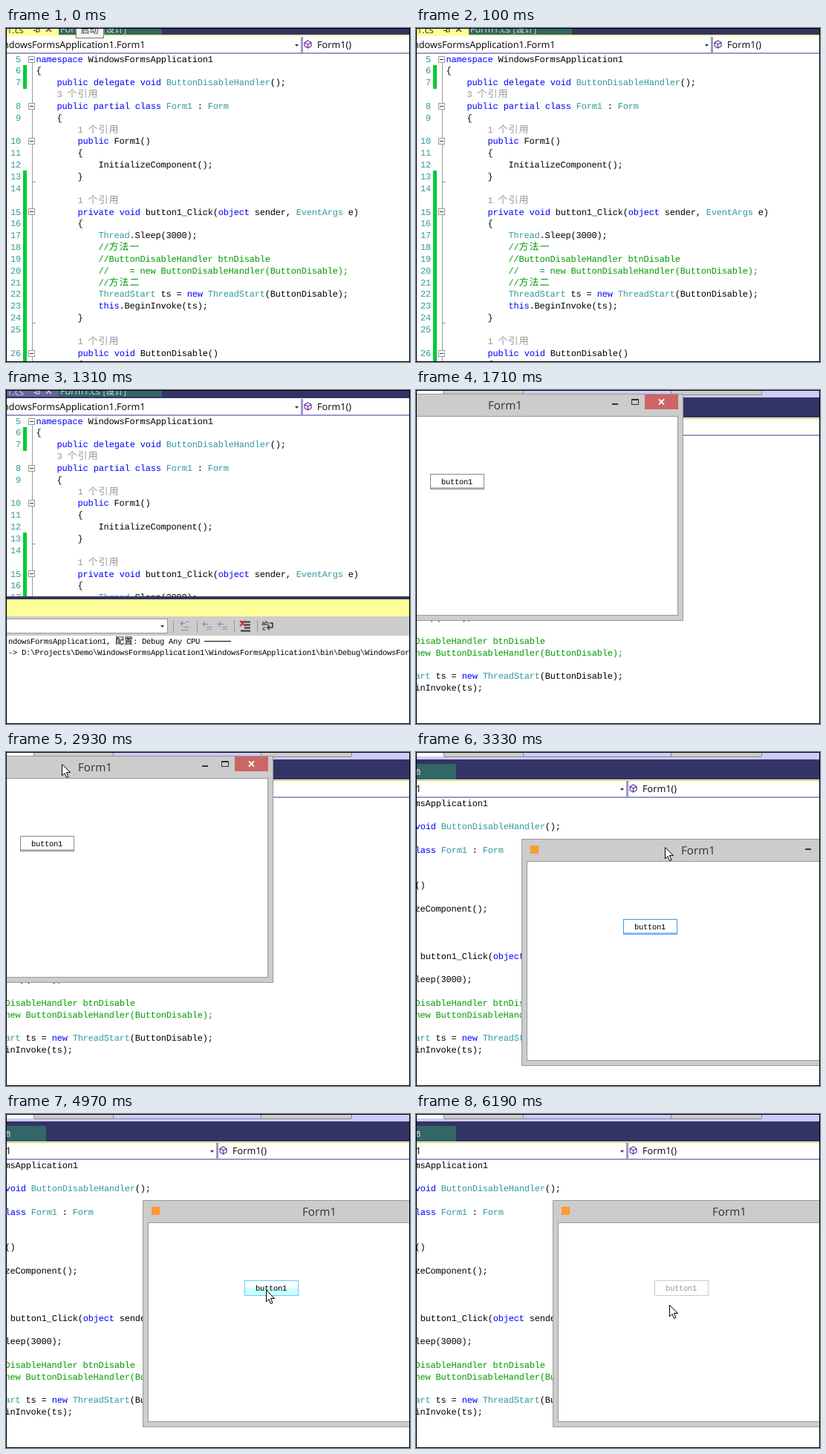
An HTML page that plays this animation: 544x450 px, repeating every 8000 ms.

```html
<!DOCTYPE html>
<html lang="zh">
<head>
<meta charset="utf-8">
<title>Form1</title>
<style>
html, body { margin: 0; width: 100%; height: 100%; overflow: hidden; background: #fff; }
svg { display: block; width: 544px; height: 450px; }
text { white-space: pre; text-rendering: geometricPrecision; }
.code { font: 12px "Liberation Mono", monospace; letter-spacing: -.2px; }
.small { font: 10.5px "Liberation Mono", monospace; letter-spacing: -.3px; }
.ui { font: 12.7px "Open Sans", sans-serif; }
.cap { font: 15.2px "Open Sans", sans-serif; fill: #333; }
.tip { font: 12px "Noto Sans CJK SC", "Noto Sans CJK", sans-serif; }
.han { font-family: "Noto Sans CJK SC", "Noto Sans CJK", sans-serif; font-size: 13px; font-weight: 300; letter-spacing: 1px; }
.small .han { font-size: 12px; letter-spacing: 0; }
.kw { fill: #00f; } .type { fill: #399; } .note { fill: #090; } .ref { fill: #999; }
</style>
</head>
<body>
<svg id="stage" viewBox="0 0 544 450"></svg>
<script>
const NAVY = '#333366', GREEN = '#336666', LILAC = '#ccccff', EDGE = '#9999cc', GRAY = '#cccccc', YELLOW = '#ffff99';
const LOOP = 8000;

const rect = (x, y, w, h, fill, stroke) => stroke
  ? `<rect x="${x + .5}" y="${y + .5}" width="${w - 1}" height="${h - 1}" fill="${fill}" stroke="${stroke}"/>`
  : `<rect x="${x}" y="${y}" width="${w}" height="${h}" fill="${fill}"/>`;
const path = (d, stroke, width = 1, fill = 'none') =>
  `<path d="${d}" fill="${fill}" stroke="${stroke}" stroke-width="${width}"/>`;
const han = s => s.replace(/[\u4e00-\u9fff]+/g, '<tspan class="han">$&</tspan>');
const text = (x, y, s, cls, fill = '#000', extra = '') =>
  `<text x="${x}" y="${y}" class="${cls}" fill="${fill}" ${extra}>${s}</text>`;
const group = (id, body) => `<g id="${id}">${body}</g>`;

// Code listing: rows without a number are reference hints
const source = `namespace WindowsFormsApplication1
{
    public delegate void ButtonDisableHandler();
    3 个引用
    public partial class Form1 : Form
    {
        1 个引用
        public Form1()
        {
            InitializeComponent();
        }

        1 个引用
        private void button1_Click(object sender, EventArgs e)
        {
            Thread.Sleep(3000);
            //方法一
            //ButtonDisableHandler btnDisable
            //    = new ButtonDisableHandler(ButtonDisable);
            //方法二
            ThreadStart ts = new ThreadStart(ButtonDisable);
            this.BeginInvoke(ts);
        }

        1 个引用
        public void ButtonDisable()
        {`.split('\n');

const syntax = /(\/\/.*|\d 个引用)|\b(namespace|public|private|delegate|void|partial|class|object|new|this)\b|\b(ButtonDisableHandler|Form1(?= :)|Form|EventArgs|ThreadStart|Thread)\b/g;
const paint = line => line.replace(syntax, (m, plain, kw) => {
  const cls = plain ? (m[0] === '/' ? 'note' : 'ref') : kw ? 'kw' : 'type';
  return `<tspan class="${cls}">${han(m)}</tspan>`;
});
const rowY = i => 42 + 15.84 * i;
const baseline = i => rowY(i) + 3.6;

function listing() {
  return source.map((line, i) => {
    const indent = line.search(/\S/);
    return indent < 0 ? '' : text(40.6 + indent * 7, baseline(i), paint(line.trim()), 'code');
  }).join('');
}

function gutter() {
  let out = rect(23, 50, 5, 32, '#00cc33') + rect(23, 192, 5, 258, '#00cc33')
    + path('M35.5 46V450M35.5 207.5H40M35.5 397.5H40', '#999');
  let n = 5;
  source.forEach((line, i) => {
    if (/个引用/.test(line)) return;
    out += text(20, baseline(i), n++, 'code', '#339999', 'text-anchor="end"');
    if (/namespace|class|\(\)$|_Click/.test(line)) {
      const y = Math.floor(rowY(i));
      out += rect(30, y - 4, 9, 9, '#fff', '#999') + path(`M32 ${y + .5}H37`, '#333');
    }
  });
  return out;
}

const caret = (x, y) => path(`M${x} ${y}h5l-2.5 3z`, 'none', 0, '#333');
const cube = (x, y) =>
  path(`M${x} ${y - 5}l4.5 2.5v5l-4.5 2.5l-4.5 -2.5v-5zM${x - 4.5} ${y - 2.5}l4.5 2.5l4.5 -2.5M${x} ${y}v5`, '#663399', 1.2);

// Navigation bar with its two drop-downs
function navBar(y, split, label, labelEnd) {
  return rect(0, y, 544, 22, '#fff') + rect(0, y + 21, 544, 2, EDGE)
    + text(labelEnd, y + 15, label, 'ui', '#000', 'text-anchor="end"')
    + caret(split - 8, y + 10) + rect(split, y, 3, 22, EDGE)
    + cube(split + 9.5, y + 10) + text(split + 22, y + 15, 'Form1()', 'ui');
}

function tabs(fill, ink, line) {
  return rect(0, 0, 544, 10, NAVY) + rect(0, 0, 71, 10, fill) + rect(71, 0, 139, 9, GREEN)
    + rect(0, 9, 544, 2, line)
    + text(1, 7, '1.cs', 'ui', ink) + path('M37 3.5h4M41 0v6M41 1h4v4h-4', ink) + path('M54 -2l7 7M61 -2l-7 7', ink, 1.3)
    + text(73, 6, 'Form1.cs ' + '<tspan class="tip">[设计]</tspan>', 'ui', '#ddd');
}

const tip = (x, w, s) => rect(x, -8, w, 22, '#f4f4f4', '#777') + text(x + 6.5, 7, s, 'tip', '#333');

function buildPanel() {
  const bar = x => rect(x, 310, 1, 17, '#999');
  const step = x => path(`M${x} 315.5h7M${x + 3} 312.5l-3 3l3 3M${x + 5} 319.5h7M${x + 5} 322.5h7`, '#8888bb', 1.2);
  return rect(0, 278, 544, 172, '#fff') + rect(0, 278, 544, 4, NAVY) + rect(0, 282, 544, 23, YELLOW)
    + rect(0, 305, 544, 26, GRAY) + rect(-2, 308, 220, 20, '#fff', '#999') + caret(208, 317)
    + bar(225) + bar(257) + bar(307) + bar(338)
    + path('M235 314.5h6M238 311.5l-3 3l3 3M242 312.5h4M239 319.5h7M236 323.5h10', '#8888bb', 1.2)
    + step(265) + step(286)
    + path('M316 312.5h13M321 316.5h8M321 320.5h8M316 324.5h13', '#333', 2)
    + path('M315 311l7 7M322 311l-7 7', '#cc3333', 2)
    + text(344, 317, 'ab', 'small', '#000', 'font-weight="bold" style="font-size:8.5px"')
    + text(345, 324, 'c', 'small', '#000', 'font-weight="bold" style="font-size:8.5px"')
    + path('M355 314h4v6h-7M355 317l-3 3l3 3', '#333', 1.5)
    + text(3, 342, han('ndowsFormsApplication1, 配置: Debug Any CPU '), 'small') + path('M267 338.5H303', '#000');
}

function runHeader() {
  return rect(0, 0, 544, 10, LILAC) + rect(0, 1, 38, 5, '#fff') + rect(38, 1, 107, 5, GRAY)
    + rect(343, 1, 122, 5, GRAY) + path('M37.5 1V6M144.5 1V6M343.5 1V6M465.5 1V6M38 6.5H465', '#888')
    + rect(0, 10, 544, 28, NAVY) + rect(0, 16, 54, 21, GREEN)
    + rect(.5, 25.5, 5, 5, 'none', '#ddd') + path('M1.5 25.5v-2h3v2', '#ddd')
    + rect(0, 37, 544, 3, '#fff') + rect(0, 38, 544, 1, '#cccc33')
    + navBar(39, 283, '1', 7);
}

// Form drawn at its first position; it is moved by a transform
function form() {
  return rect(-118, 5, 478, 306, GRAY, '#999') + rect(-111, 35, 464, 269, '#fff', '#999')
    + rect(-106, 14, 11, 11, '#ff9933')
    + text(97, 26, 'Form1', 'cap')
    + rect(264, 18, 8, 2, '#333') + rect(290, 12, 10, 8, 'none', '#333') + rect(290, 12, 10, 2, '#333')
    + rect(308, 6, 45, 20, '#cc6666') + path('M327 12.5l7 7M334 12.5l-7 7', '#fff', 1.8)
    + rect(19, 113, 73, 21, '#fff') + '<rect id="glow" x="20" y="123" width="71" height="10"/>'
    + '<rect id="base" x="20" y="131" width="71" height="2"/>'
    + '<rect id="rim" x="19.5" y="113.5" width="72" height="20" fill="none"/>'
    + '<text id="label" class="small" x="34" y="127">button1</text>';
}

const stage = document.getElementById('stage');
stage.innerHTML = rect(0, 0, 544, 450, '#fff')
  + group('edit', gutter() + listing()
    + group('lit', tabs(YELLOW, '#333', YELLOW)) + group('dim', tabs('#666699', '#ddd', NAVY))
    + navBar(12, 397, 'indowsFormsApplication1.Form1', 187.5)
    + group('tip1', tip(94, 38, '启动'))
    + group('build', buildPanel())
    + group('done', text(3, 357, '-&gt; D:\\Projects\\Demo\\WindowsFormsApplication1\\WindowsFormsApplication1\\bin\\Debug\\WindowsFormsApplication1.exe', 'small')))
  + group('run', `<g transform="translate(-182 27)">${listing()}</g>` + runHeader()
    + group('form', form()) + group('tip2', tip(94, 102, '继续运行程序(F5)'))
    + group('mouse', path('M.5 .5V16L4 12.5L6.5 18.5L9 17.5L6.5 11.5H11.5Z', '#000', 1, '#fff')))
  + rect(0, 0, 544, 450, 'none', '#000');

const $ = id => document.getElementById(id);
const show = (id, on) => $(id).setAttribute('display', on ? 'inline' : 'none');
const set = (id, attrs) => { for (const k in attrs) $(id).setAttribute(k, attrs[k]); };
const at = (steps, t) => steps.filter(s => s[0] <= t).pop();

const formSteps = [[0, 0, 0], [3330, 260, 112], [3750, 302, 111]];
const mouseSteps = [[0, -40, -40], [2930, 75, 16], [3330, 335, 128], [3750, 352, 176], [4150, 351, 232],
  [4570, 350, 237], [5370, 348, 241], [5790, 341, 257]];
// Button looks: time, rim, lower half, bottom line, text
const looks = [
  [0, '#888888', 'none', '#bbbbbb', '#000'],
  [3330, '#3399ff', 'none', '#99ccff', '#000'],
  [4150, '#66ccff', '#ccffff', 'none', '#000'],
  [4570, '#3399cc', '#99ccff', 'none', '#000'],
  [4970, '#66ccff', '#ccffff', 'none', '#000'],
  [6190, '#cccccc', 'none', 'none', '#999']
];

function draw(t) {
  const running = t >= 1710;
  show('edit', !running);
  show('run', running);
  show('lit', t < 890);
  show('dim', t >= 890);
  show('tip1', t < 100);
  show('build', t >= 890);
  show('done', t >= 1310);
  show('tip2', t >= 2530 && t < 2930);
  const [, fx, fy] = at(formSteps, t), [, mx, my] = at(mouseSteps, t);
  set('form', { transform: `translate(${fx} ${fy})` });
  set('mouse', { transform: `translate(${mx} ${my})` });
  const [, rim, glow, base, ink] = at(looks, t);
  set('rim', { stroke: rim });
  set('glow', { fill: glow });
  set('base', { fill: base });
  set('label', { fill: ink });
}

const start = performance.now();
function tick() {
  draw((performance.now() - start) % LOOP);
  requestAnimationFrame(tick);
}
tick();
</script>
</body>
</html>
```
